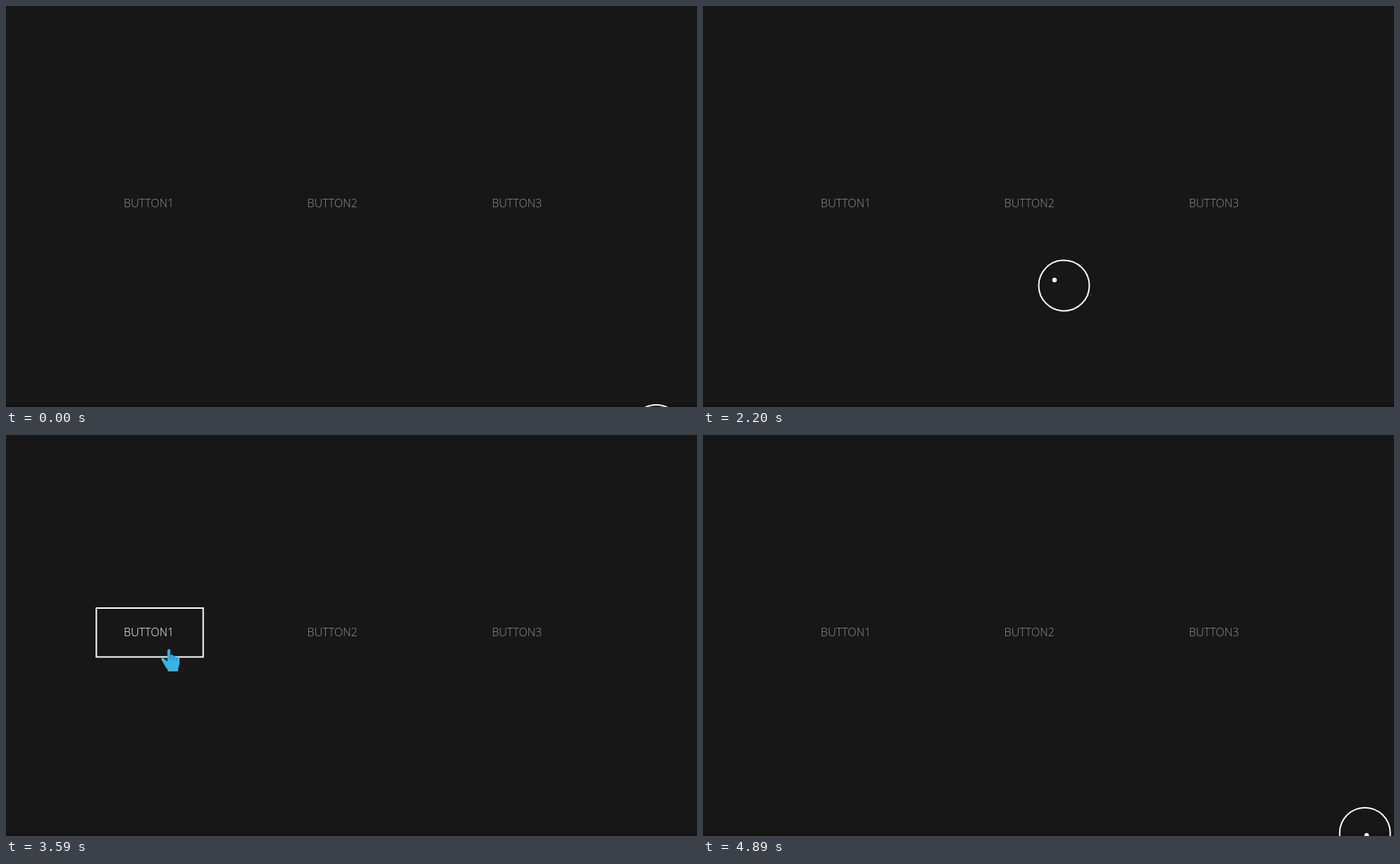
Recreate the animation shown at these times as an HTML page. Size 983 by 570 pixels, loop 5.12 s.

```html
<!DOCTYPE html>
<html lang="en">
<head>
<meta charset="utf-8">
<title>Magnetic cursor</title>
<style>
  html, body { margin: 0; width: 100%; height: 100%; overflow: hidden; background: #171717; }
  svg { display: block; width: 100%; height: 100%; }
  text { font: 300 16px "Open Sans", "Noto Sans", sans-serif; text-anchor: middle; }
</style>
</head>
<body>
<svg viewBox="0 0 983 570">
  <rect width="983" height="570" fill="#171717"/>
  <rect y="566" width="983" height="4" fill="#141213"/>
  <text x="203.2" y="286">BUTTON1</text>
  <text x="464.2" y="286">BUTTON2</text>
  <text x="726.8" y="286">BUTTON3</text>
  <rect id="ring" fill="none" stroke="#fff" stroke-width="2"/>
  <circle id="dot" r="3.2" fill="#fff"/>
  <g id="hand">
    <path fill="#33b5e5" d="M-2 2.2a2 2 0 0 1 4.2 0V9.5q2-2.5 4.2 0v1q2.2-2 4.2.6v1q2.5-1.8 4.6 1V20q0 3-1.5 6l-.7 6H-1.5V29.5Q-5 26 -7 21.5L-10.5 15.5q-.6-2.7 2-2.5 2 .3 3.5 2.5L-2 18z"/>
    <path fill="none" stroke="#1d6480" stroke-width=".7" d="M2.2 9.5v6M6.4 10.5v5.5M10.6 12v4.5"/>
  </g>
</svg>
<script>
const LOOP = 5120, FIRST_STEP = 202, STEP = 76.7, STEPS = 62, TICK = 2;
const FOLLOW = 105, SNAP = 35, HOVER_DELAY = 70;   // ms
const RING = 72, BOX_W = 152, BOX_H = 69.5, BOX_Y = 280.75;
const BOX_X = [204.5, 464.5, 727];
const ENTRY = [925, 603];

// Hand strokes with rests between them; points are evenly spaced in time.
const strokes = [
  { from: 100, to: 650, through: [[914, 440], [905, 408], [891, 406]] },
  { from: 760, to: 1207, through: [[790, 378], [706, 338], [681, 267]] },
  { from: 1590, to: 2590, through: [[620, 372], [520, 409], [501, 392], [490, 320], [468, 282]] },
  { from: 2665, to: 3201, through: [[310, 281], [276, 283], [222, 302]] },
  { from: 3540, to: 4940, through: [[346, 335], [639.5, 404], [716, 413], [779, 430], [846, 478], [928, 547], [948, 572], [943, 568]] }
];
strokes.forEach((stroke, i) => {
  const start = i ? strokes[i - 1].through.at(-1) : ENTRY;
  stroke.points = [start, ...stroke.through];
});

const mix = (a, b, k) => a + (b - a) * k;
const approach = tau => 1 - Math.exp(-TICK / tau);

// Smooth curve through evenly spaced values, without overshoot, at rest at both ends.
function curve(values, u) {
  const i = Math.min(Math.floor(u), values.length - 2), k = u - i;
  const rise = j => values[j + 1] - values[j];
  const slope = j => {
    if (j === 0 || j === values.length - 1) return 0;
    const a = rise(j - 1), b = rise(j);
    return a * b > 0 ? 2 * a * b / (a + b) : 0;
  };
  const bend = k * (1 - k) * (slope(i) * (1 - k) - slope(i + 1) * k);
  return mix(values[i], values[i + 1], k * k * (3 - 2 * k)) + bend;
}

function pointer(t) {
  const { from, to, points } = strokes.findLast(s => t >= s.from) || strokes[0];
  const progress = Math.min(1, Math.max(0, (t - from) / (to - from)));
  return [0, 1].map(axis => curve(points.map(p => p[axis]), progress * (points.length - 1)));
}

function buttonAt([x, y]) {
  const inRow = Math.abs(y - BOX_Y) < BOX_H / 2 + 1;
  return inRow ? BOX_X.findIndex(cx => Math.abs(x - cx) < BOX_W / 2 + 1) : -1;
}

// The ring trails the pointer, so its states are worked out once in advance.
function trace() {
  const states = [];
  let [x, y] = ENTRY, held = 0, button = 0;
  for (let t = 0; t <= LOOP; t += TICK) {
    const point = pointer(t), over = buttonAt(point);
    const caught = over >= 0 && buttonAt(pointer(t - HOVER_DELAY)) === over;
    if (caught) button = over;
    const [tx, ty] = caught ? [BOX_X[over], BOX_Y] : point;
    const pull = approach(caught ? SNAP : FOLLOW);
    x = mix(x, tx, pull);
    y = mix(y, ty, pull);
    held = mix(held, caught ? 1 : 0, approach(SNAP));
    states.push({ x, y, held, button, over, point });
  }
  return states;
}

const states = trace();
const labels = document.querySelectorAll("text");
const [ring, dot, hand] = ["ring", "dot", "hand"].map(id => document.getElementById(id));

function set(node, attrs) {
  for (const name in attrs) node.setAttribute(name, attrs[name]);
}

function draw(now) {
  const step = Math.min(STEPS - 1, Math.floor((now % LOOP - FIRST_STEP) / STEP));
  const t = step < 0 ? 0 : 210 + step * STEP;
  const { x, y, held, button, over, point: [px, py] } = states[Math.round(t / TICK)];
  const width = mix(RING, BOX_W, held), height = mix(RING, BOX_H, held);

  set(ring, { x: x - width / 2, y: y - height / 2, width, height, rx: RING / 2 * (1 - held) });
  set(dot, { cx: px, cy: py, opacity: 1 - held });
  set(hand, { transform: `translate(${px - 1.7} ${py - 1})`, visibility: over < 0 ? "hidden" : "visible" });
  labels.forEach((label, i) => {
    const grey = Math.round(mix(145, 255, i === button ? held : 0));
    set(label, { fill: `rgb(${grey},${grey},${grey})` });
  });
}

const start = performance.now();
function frame() {
  draw(performance.now() - start);
  requestAnimationFrame(frame);
}
frame();
</script>
</body>
</html>
```
